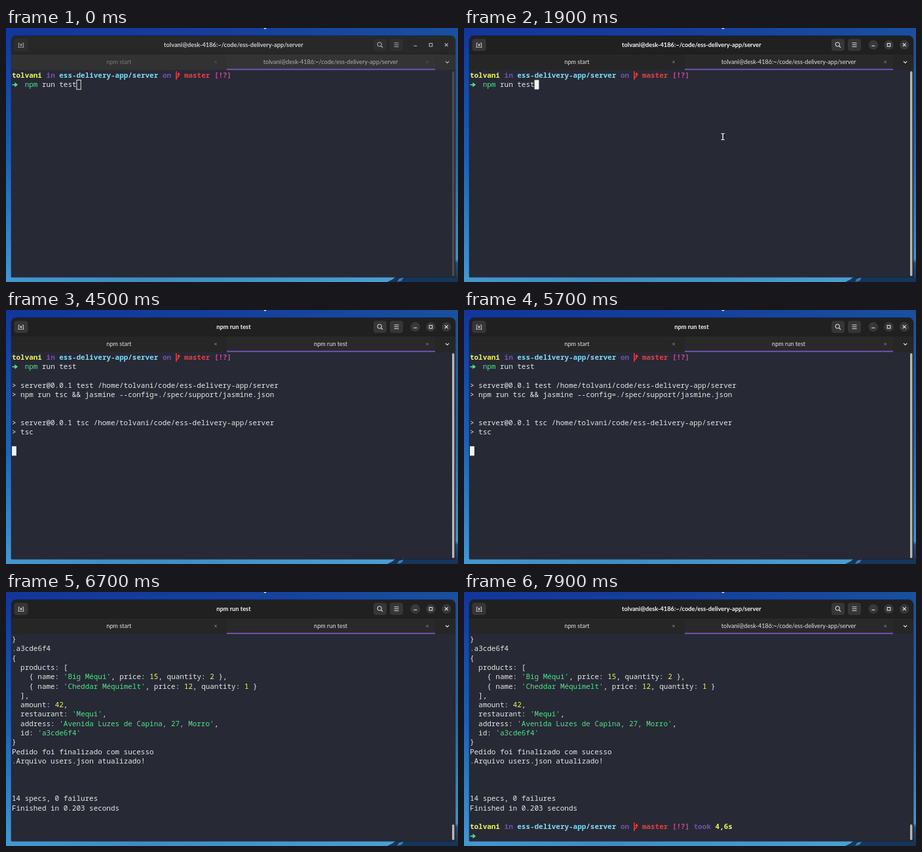
An HTML page with a canvas that plays this animation: 690x388 px, repeating every 8 s.

```html
<!DOCTYPE html>
<html lang="en">
<head>
<meta charset="utf-8">
<title>Terminal test run</title>
<style>
html, body { margin: 0; width: 100%; height: 100%; overflow: hidden; background: #143f9c; }
canvas { display: block; width: 690px; height: 388px; }
</style>
</head>
<body>
<canvas id="stage"></canvas>
<script>
const W = 690, H = 388, LOOP = 8000;
const canvas = document.getElementById('stage');
const ctx = canvas.getContext('2d');
const dpr = window.devicePixelRatio || 1;
canvas.width = W * dpr;
canvas.height = H * dpr;

const MONO = '"Noto Sans Mono", "DejaVu Sans Mono", monospace';
const UI = 'Lato, "Open Sans", sans-serif';
const LEFT = 9, TOP = 65.1, COL = 6.572, ROW = 14.31;
const C = {
  bg: '#272935', text: '#e9e9e6', green: '#50e38a', yellow: '#eef65f',
  purple: '#7450b0', cyan: '#7fdcf2', red: '#e2403f', pink: '#c94a98', accent: '#7355bd'
};

const USER = 'tolvani', DIR = 'ess-delivery-app/server';
const PATH_TITLE = `${USER}@desk-4186:~/code/${DIR}`;
const RUN_TITLE = 'npm run test';
const HOME = `/home/${USER}/code/${DIR}`;

// Moments in ms
const FOCUS = 1600, ENTER = 2100, TEST = 2400, TSC = 2700,
      STARTED = 6500, RESULT = 6700, PROMPT = 6800, BRANCH = 6900;

const SPECS = [
  [0, '}'],
  [1, ['green', '.'], 'a3cde6f4'],
  [2, '{'],
  [3, '  products: ['],
  [4, ...product('Big Méqui', 15, 2), ','],
  [5, ...product('Cheddar Méquimelt', 12, 1)],
  [6, '  ],'],
  [7, '  amount: ', ['yellow', '42'], ','],
  [8, '  restaurant: ', ['green', "'Mequi'"], ','],
  [9, '  address: ', ['green', "'Avenida Luzes de Capina, 27, Morro'"], ','],
  [10, '  id: ', ['green', "'a3cde6f4'"]],
  [11, '}'],
  [12, 'Pedido foi finalizado com sucesso'],
  [13, ['green', '.'], 'Arquivo users.json atualizado!'],
  [17, '14 specs, 0 failures'],
  [18, 'Finished in 0.203 seconds']
];

function product(name, price, count) {
  return ['    { name: ', ['green', `'${name}'`], ', price: ', ['yellow', price],
    ', quantity: ', ['yellow', count], ' }'];
}

const grey = (a, b, k) => {
  const v = Math.round(a + (b - a) * k);
  return `rgb(${v},${v},${v})`;
};

function rect(x, y, w, h, color) {
  ctx.fillStyle = color;
  ctx.fillRect(x, y, w, h);
}

function round(x, y, w, h, r, color) {
  ctx.beginPath();
  ctx.roundRect(x, y, w, h, r);
  ctx.fillStyle = color;
  ctx.fill();
}

function trace(points) {
  ctx.beginPath();
  for (let i = 0; i < points.length; i += 2) ctx.lineTo(points[i], points[i + 1]);
}

function poly(points, color, width = 1) {
  trace(points);
  ctx.strokeStyle = color;
  ctx.lineWidth = width;
  ctx.stroke();
}

function solid(points, color) {
  trace(points);
  ctx.fillStyle = color;
  ctx.fill();
}

function blend(x0, y0, x1, y1, stops) {
  const g = ctx.createLinearGradient(x0, y0, x1, y1);
  for (const [at, color] of stops) g.addColorStop(at, color);
  return g;
}

function cross(x, y, r, color, width) {
  poly([x - r, y - r, x + r, y + r], color, width);
  poly([x + r, y - r, x - r, y + r], color, width);
}

function label(text, x, y, font, color) {
  ctx.font = font;
  ctx.textAlign = 'center';
  ctx.fillStyle = color;
  ctx.fillText(text, x, y);
}

const colX = col => LEFT + col * COL;
const rowY = row => TOP + row * ROW;

function type(col, row, text, color = 'text', bold = false) {
  ctx.font = `${bold ? 700 : 400} 10.95px ${MONO}`;
  ctx.textAlign = 'left';
  ctx.fillStyle = C[color];
  ctx.fillText(text, colX(col), rowY(row) + 10.9);
}

function line([row, ...parts]) {
  let col = 0;
  for (const part of parts) {
    const [color, value] = Array.isArray(part) ? part : ['text', part];
    const text = String(value);
    type(col, row, text, color);
    col += text.length;
  }
}

function arrow(row) {
  const y = rowY(row) + 7.3, x = LEFT + 0.5;
  poly([x, y, x + 6, y], C.green, 1.6);
  solid([x + 3.8, y - 3.6, x + 8.6, y, x + 3.8, y + 3.6], C.green);
}

function branchIcon(row) {
  const x = colX(38), y = rowY(row);
  poly([x + 1.2, y + 1, x + 1.2, y + 14], C.red, 1.6);
  poly([x + 1.2, y + 11, x + 4.6, y + 8.5, x + 4.8, y + 5], C.red, 1.5);
  solid([x + 2.2, y + 6.5, x + 4.8, y + 2.5, x + 7.6, y + 6.5], C.red);
}

function prompt(row, branch, took) {
  type(0, row, USER, 'yellow', true);
  type(8, row, 'in', 'purple', true);
  type(11, row, DIR, 'cyan', true);
  if (branch) {
    type(35, row, 'on', 'purple', true);
    branchIcon(row);
    type(40, row, 'master', 'red', true);
    type(47, row, '[!?]', 'pink', true);
  }
  if (took) {
    const col = branch ? 52 : 35;
    type(col, row, 'took', 'purple', true);
    type(col + 5, row, took, 'yellow', true);
  }
  arrow(row + 1);
}

function wallpaper() {
  rect(0, 0, W, H, blend(0, 0, W, 0, [[0, '#12369a'], [0.5, '#153f9c'], [1, '#19509f']]));
  rect(0, 8, 9, H, blend(0, 0, 0, H, [[0, '#12369a'], [0.5, '#1c5fb2'], [1, '#4597cf']]));
  rect(685, 8, 5, H, blend(0, 0, 0, H, [[0, '#19509f'], [0.5, '#2068b8'], [0.91, '#3f94d2'], [0.925, '#1d4f80'], [1, '#16395c']]));
  rect(0, 380, W, 8, '#15365a');
  solid([0, 380, 595, 380, 590, 384, 582, 388, 0, 388],
    blend(0, 0, 595, 0, [[0, '#4597cf'], [0.35, '#3f8cc2'], [1, '#4b9fd3']]));
  solid([597, 388, 600, 383, 607, 381, 604, 386], '#3a7fb2');
  round(393.5, -2, 4, 3.4, 1.5, '#e8eefc');
}

function header(title, focus) {
  round(7.5, 11.3, 679, 370, [8, 8, 2, 2], 'rgba(8,12,28,0.5)');
  round(8, 12, 678, 40, [8, 8, 0, 0], grey(40, 32, focus));
  rect(8, 40, 678, 24, grey(50, 38, focus));
  rect(337, 40, 318, 23, grey(52, 41, focus));
  rect(8, 39.5, 678, 0.6, '#191919');

  const ink = grey(190, 238, focus);
  const button = grey(47, 54, focus);
  round(12.5, 16.5, 21, 18.5, 4, button);
  round(561, 16.5, 20, 18.5, 4, button);
  round(586, 16.5, 20, 18.5, 4, button);

  poly([21, 23, 19.3, 23, 19.3, 29.6], ink, 0.8);
  poly([24.8, 23, 26.6, 23, 26.6, 29.6], ink, 0.8);
  poly([18.5, 29.4, 27.4, 29.4], ink, 0.7);
  poly([23, 23.8, 23, 28], ink, 0.9);
  poly([20.9, 25.9, 25.1, 25.9], ink, 0.9);

  ctx.beginPath();
  ctx.arc(570.2, 25, 3.2, 0, Math.PI * 2);
  ctx.lineWidth = 1;
  ctx.stroke();
  poly([572.5, 27.3, 575, 29.8], ink, 1.2);
  for (const y of [22.8, 25.7, 28.6]) poly([592.5, y, 599.5, y], ink, 0.9);

  for (const x of [624.8, 648.5, 672.3]) {
    ctx.beginPath();
    ctx.arc(x, 25.8, 7.2, 0, Math.PI * 2);
    ctx.fillStyle = grey(40, 56, focus);
    ctx.fill();
  }
  poly([622.3, 27.3, 627.3, 27.3], ink);
  ctx.strokeRect(646.2, 23.5, 4.6, 4.6);
  cross(672.3, 25.8, 2.4, ink, 1.1);

  label(title, 347.4, 29, `700 9.25px ${UI}`, grey(205, 246, focus));
  label('npm start', 172.5, 55, `400 9.1px ${UI}`, grey(122, 228, focus));
  label(title, 495.6, 55, `400 9.1px ${UI}`, grey(176, 228, focus));
  const faint = grey(90, 145, focus);
  cross(320, 52, 1.8, faint, 0.8);
  cross(643.2, 52, 1.8, faint, 0.8);
  poly([671, 50.8, 673.6, 53.4, 676.2, 50.8], ink, 1.1);

  rect(8, 64, 678, 316.6, C.bg);
  rect(337, 62.3, 318, 1.9, C.accent);
}

function cursor(col, row, focused) {
  const x = colX(col), y = rowY(row);
  if (focused) return rect(x, y, 6.8, ROW, '#f4f4ef');
  ctx.strokeStyle = '#e4e4df';
  ctx.lineWidth = 1;
  ctx.strokeRect(x + 0.3, y + 0.1, 6.4, ROW);
}

function pointer(x, y) {
  const half = [-2.6, -4.6, -0.8, -4.6, 0, -3.8, 0, 3.8, -0.8, 4.6, -2.6, 4.6];
  for (const [color, width] of [['#15161c', 2.6], ['#f2f2f2', 1.1]]) {
    for (const side of [1, -1]) {
      poly(half.map((v, i) => i % 2 ? y + v : x + v * side), color, width);
    }
  }
}

function session(t) {
  prompt(0, true);
  type(3, 1, 'npm', 'green');
  type(7, 1, 'run test');
  if (t >= TEST) {
    line([3, `> server@0.0.1 test ${HOME}`]);
    line([4, '> npm run tsc && jasmine --config=./spec/support/jasmine.json']);
  }
  if (t >= TSC) {
    line([7, `> server@0.0.1 tsc ${HOME}`]);
    line([8, '> tsc']);
  }
  if (t >= STARTED) {
    line([10, 'Started']);
    line([11, 'Example app listening on port 3000!']);
    line([12, 'Coupon SEGUNDACOMPRA has been deleted.']);
  }
}

function cursorCell(t) {
  if (t < ENTER) return [15, 1];
  if (t < TEST) return [0, 2];
  if (t < TSC) return [0, 6];
  if (t < STARTED) return [0, 10];
  if (t < RESULT) return [0, 13];
  return t < PROMPT ? [0, 19] : [3, 21];
}

function draw(t) {
  const k = Math.min(1, Math.max(0, (t - FOCUS) / 200));
  const focus = 1 - (1 - k) ** 2;
  const running = t >= ENTER && t < PROMPT;
  const done = t >= RESULT;

  ctx.setTransform(dpr, 0, 0, dpr, 0, 0);
  wallpaper();
  header(running ? RUN_TITLE : PATH_TITLE, focus);

  if (done) {
    SPECS.forEach(line);
    if (t >= PROMPT) prompt(20, t >= BRANCH, '4,6s');
  } else {
    session(t);
  }

  const lit = t < ENTER || Math.floor((t - ENTER) / 600) % 2 === 0;
  if (lit) cursor(...cursorCell(t), t >= FOCUS);

  const thumb = done ? 355 : 66;
  round(681, thumb, 3.4, 379 - thumb, 1.7, grey(76, 184, focus));
  if (t >= FOCUS && t < ENTER) pointer(395.2, 166);
}

const start = performance.now();
function tick() {
  draw((performance.now() - start) % LOOP);
  requestAnimationFrame(tick);
}
tick();
</script>
</body>
</html>
```
